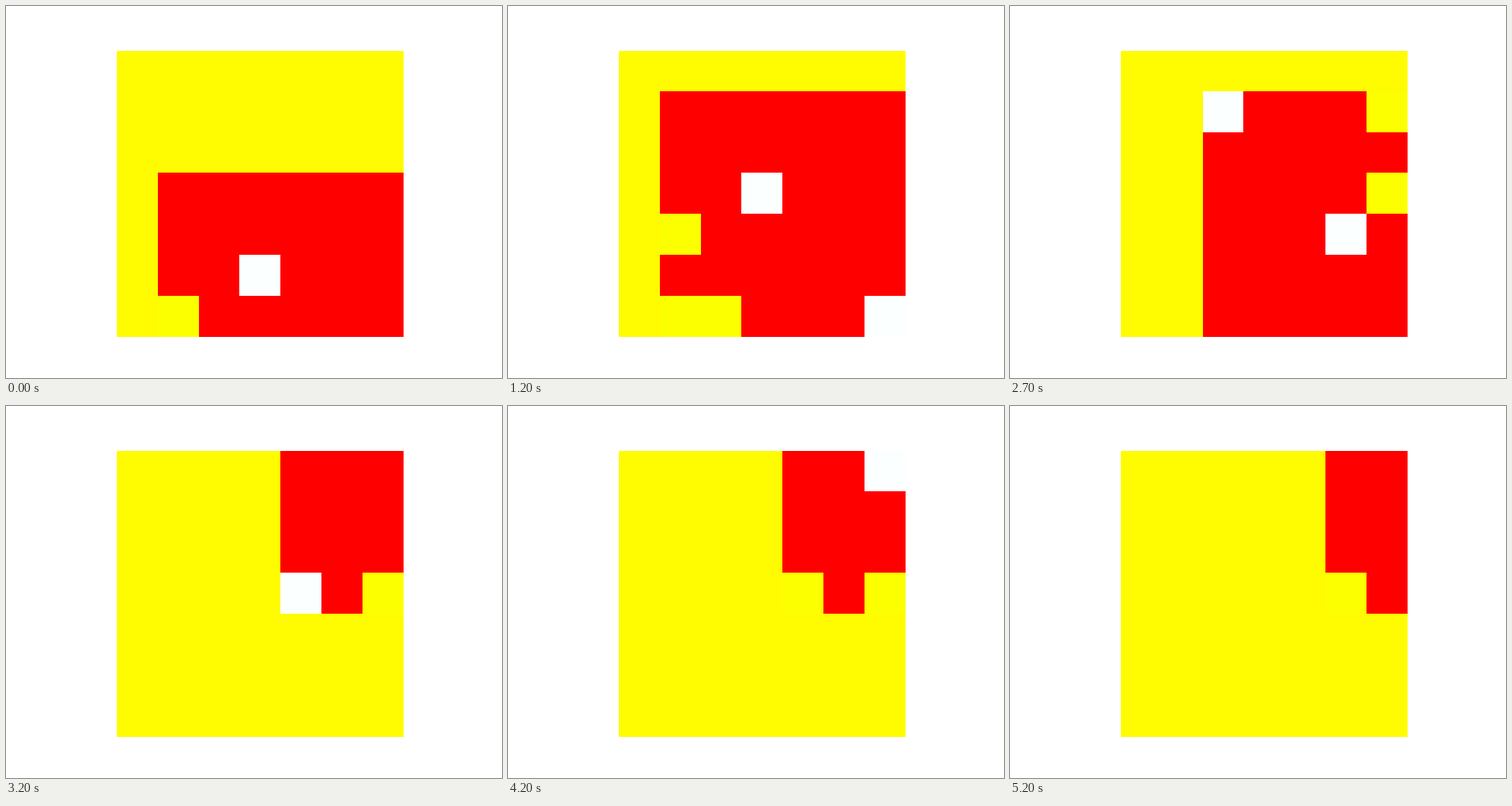
Write an HTML page that moves like this. It is 640x480 px and loops after 5300 ms.

```html
<!DOCTYPE html>
<html lang="en">
<head>
<meta charset="utf-8">
<title>Grid walker view</title>
<style>
html, body { margin: 0; width: 100%; height: 100%; overflow: hidden; background: #fff; }
svg { display: block; }
</style>
</head>
<body>
<svg id="stage" width="640" height="480" viewBox="0 0 640 480" shape-rendering="crispEdges"></svg>
<script>
const STEP = 100;
const ROOM = 6;
const VIEW = 7;
const XS = [143, 196, 249, 301, 354, 407, 460, 513];
const YS = [58, 110, 163, 215, 268, 321, 374, 427];
const WALL = '#fffb00', FLOOR = '#ff0000', ITEM = '#fcff00', BOX = '#fcffff';

// F forward, L/R turn, P pick up, D drop into box, W wait
const MOVES = 'FFRFRFF' + 'LFLLR' + 'FFRFLF' + 'FPLFLWLFR' +
  'FFFFLFDLFR' + 'FLFFP' + 'LFFDLLFFLF';
const DIRS = [[1, 0], [0, 1], [-1, 0], [0, -1]];

const key = (x, y) => x + ',' + y;
const inside = (x, y) => x >= 0 && y >= 0 && x < ROOM && y < ROOM;

// The walker stands at the middle of the right edge and looks left.
function look({ x, y, dir, carry, things }) {
  const [fx, fy] = DIRS[dir];
  const cells = [];
  for (let row = 0; row < VIEW; row++) {
    for (let col = 0; col < VIEW; col++) {
      const ahead = VIEW - 1 - col, side = row - 3;
      const cx = x + fx * ahead - fy * side;
      const cy = y + fy * ahead + fx * side;
      if (!inside(cx, cy)) cells.push(WALL);
      else if (!ahead && !side) cells.push(carry ? ITEM : FLOOR);
      else cells.push(things.get(key(cx, cy)) || FLOOR);
    }
  }
  return cells;
}

function walk() {
  const s = {
    x: 0, y: 0, dir: 0, carry: false,
    things: new Map([
      ['3,2', BOX], ['0,5', BOX],
      ['5,3', ITEM], ['4,5', ITEM], ['5,5', ITEM]
    ])
  };
  const views = [look(s)];
  for (const move of MOVES) {
    const [fx, fy] = DIRS[s.dir];
    const front = key(s.x + fx, s.y + fy);
    if (move === 'F') { s.x += fx; s.y += fy; }
    if (move === 'L') s.dir = (s.dir + 3) % 4;
    if (move === 'R') s.dir = (s.dir + 1) % 4;
    if (move === 'P') { s.things.delete(front); s.carry = true; }
    if (move === 'D') { s.things.set(front, ITEM); s.carry = false; }
    views.push(look(s));
  }
  return views;
}

const stage = document.getElementById('stage');
const rects = [];
for (let i = 0; i < VIEW * VIEW; i++) {
  const col = i % VIEW, row = (i - col) / VIEW;
  const r = document.createElementNS('http://www.w3.org/2000/svg', 'rect');
  r.setAttribute('x', XS[col]);
  r.setAttribute('y', YS[row]);
  r.setAttribute('width', XS[col + 1] - XS[col]);
  r.setAttribute('height', YS[row + 1] - YS[row]);
  stage.appendChild(r);
  rects.push(r);
}

const views = walk();
let shown = -1;

function draw(ms) {
  const n = Math.floor(ms / STEP) % views.length;
  if (n === shown) return;
  shown = n;
  rects.forEach((r, i) => r.setAttribute('fill', views[n][i]));
}

const start = performance.now();
function tick() {
  draw(performance.now() - start);
  requestAnimationFrame(tick);
}
tick();
</script>
</body>
</html>
```
